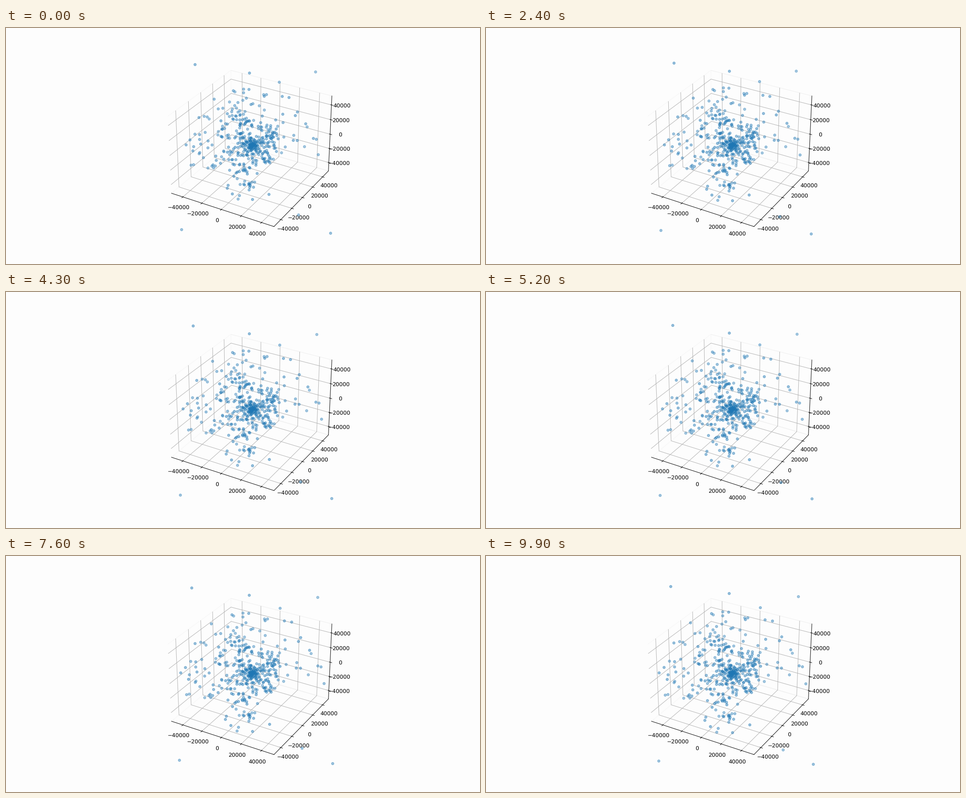
Animation of 1058 by 529 pixels, one loop 10000 ms. Source, as a matplotlib script:

```python
import numpy as np
import matplotlib.pyplot as plt
from matplotlib.animation import FuncAnimation

plt.rcParams["text.hinting"] = "none"

W, H = 1058, 529
FRAMES, INTERVAL = 100, 100
PAPER = "#fdfdfd"
BLUE = (0x1F / 255, 0x77 / 255, 0xB4 / 255)
CENTRE = np.array([550, 262])
GROWTH = 0.095  # share of its distance a point gains per loop
rng = np.random.default_rng(11)

# Lone points far out: x, y in pixels and own growth
LONE = np.array([
    (422, 82, 0.075), (543.5, 101, 0.105), (691, 98.5, 0.045),
    (610, 121.5, 0.04), (392, 452, 0.04), (724.5, 460, 0.035),
    (653, 419, 0.1), (402, 262, 0.105), (697, 284, 0.115),
    (587, 373, 0.05),
])
CLUMPS = [(591, 241), (585, 292), (541, 350), (508, 195)]


def cloud(n, near, far, power, first=0, last=360):
    """Points around the centre, denser inwards; angles run clockwise."""
    r = near + (far - near) * rng.random(n) ** power
    a = np.radians(rng.uniform(first, last, n))
    return CENTRE + np.column_stack([r * np.cos(a), 0.87 * r * np.sin(a)])


def clump(spot, n=11, spread=7):
    return spot + spread * np.clip(rng.normal(size=(n, 2)), -2, 2)


inner = np.vstack([
    cloud(275, 0, 62, 1.6),
    cloud(145, 55, 148, 1.2, first=80, last=380),  # gap at the lower right
    *[clump(spot) for spot in CLUMPS],
])
start = np.vstack([LONE[:, :2], inner])
growth = np.append(LONE[:, 2], np.full(len(inner), GROWTH))
drift = (start - CENTRE) * growth[:, None]
colors = [BLUE + (a,) for a in rng.uniform(0.38, 0.47, len(start))]

fig = plt.figure(figsize=(12, 6), dpi=W / 12, facecolor=PAPER)

# Empty 3D frame
box = fig.add_subplot(projection="3d", facecolor=PAPER)
lim = 50000 * 25 / 24
box.set(xlim=(-lim, lim), ylim=(-lim, lim), zlim=(-lim, lim))
for axis in (box.xaxis, box.yaxis, box.zaxis):
    axis.set_ticks(np.arange(-40000, 40001, 20000))
    axis.pane.set_fill(False)

# Points live in pixel space above the frame
sky = fig.add_axes([0, 0, 1, 1], zorder=5)
sky.set(xlim=(0, W), ylim=(H, 0))
sky.axis("off")
dots = sky.scatter(start[:, 0], start[:, 1], s=20, c=colors)


def update(i):
    dots.set_offsets(start + drift * i / (FRAMES - 1))
    return dots,


anim = FuncAnimation(fig, update, frames=FRAMES, interval=INTERVAL,
                     init_func=lambda: update(0), repeat=True)
plt.show()
```
